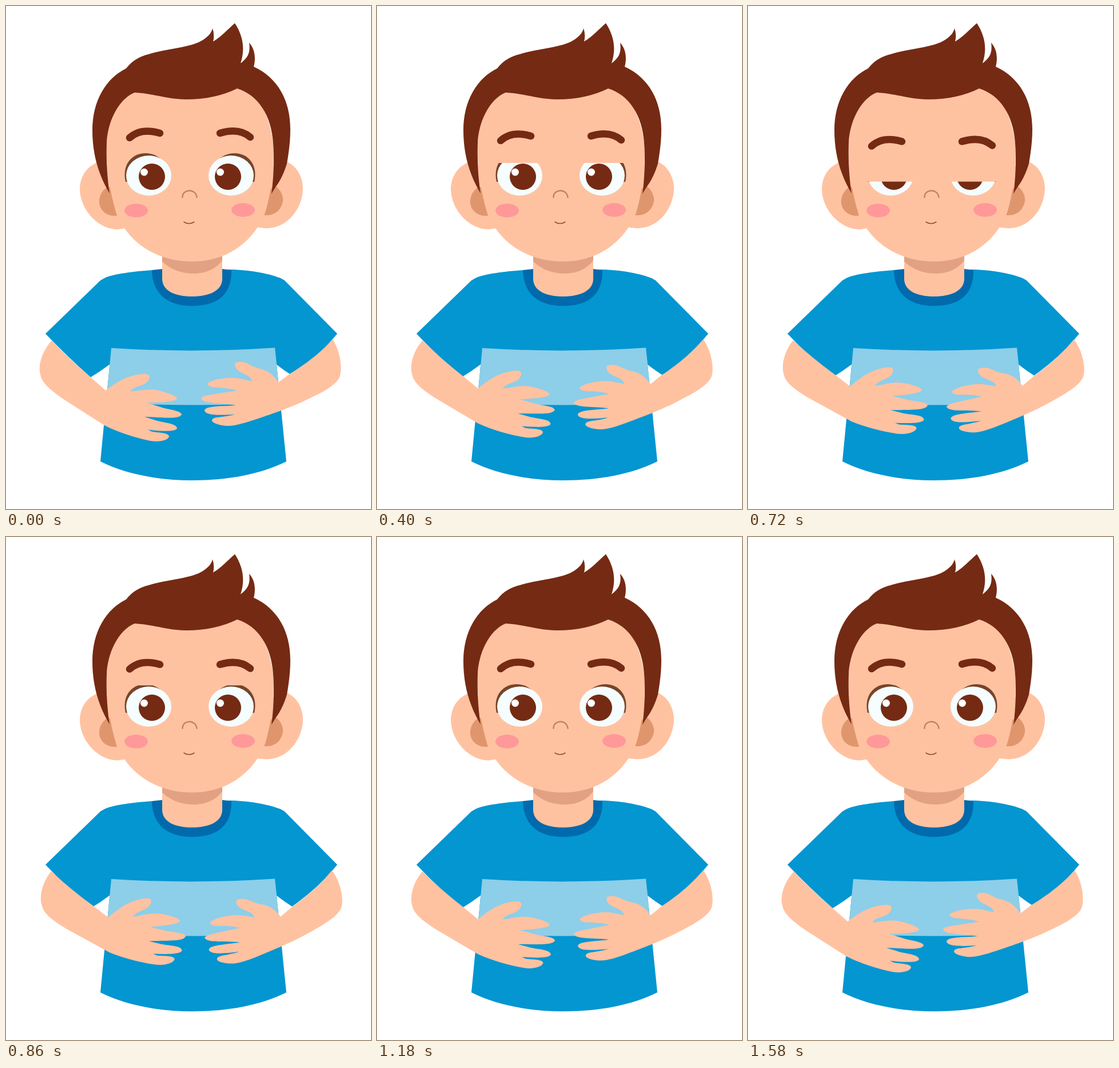
Animation of 638 by 878 pixels, one loop 1600 ms. Source, as an HTML page:

```html
<!DOCTYPE html>
<html lang="en">
<head>
<meta charset="utf-8">
<title>Boy holding his belly</title>
<style>
  html, body { margin: 0; width: 100%; height: 100%; overflow: hidden; background: #fff; }
  svg { display: block; width: 100vw; height: 100vh; }
  .skin { fill: #ffc2a1; }
  .hair { fill: #752a13; }
  .shirt { fill: #0396d1; }
  .ear { fill: #e0966d; }
  .cheek { fill: #ff9999; }
  .line { fill: none; stroke-linecap: round; }
  .brow { stroke: #752a13; stroke-width: 12.5; }
</style>
</head>
<body>
<svg viewBox="0 0 638 878">
  <defs>
    <clipPath id="open"><rect id="lid" x="190" y="250" width="260" height="100"/></clipPath>
    <g id="eye">
      <path fill="#75452a" d="M209 307C202 276 221 257 243 257C258 257 270 264 277 275L249 300Z"/>
      <ellipse cx="249.5" cy="296" rx="39.5" ry="35" fill="#f5fdff"/>
      <circle class="hair" cx="255" cy="298" r="23"/>
    </g>
  </defs>

  <!-- body -->
  <path class="shirt" d="M255 461C225 463 185 468 172 475L165 479L69 572Q108 613 148 648Q166 637 182 625L184 597L165 795C210 818 270 828 325 828C390 828 445 817 490 795L470 597L473 626Q486 636 500 645Q547 612 579 572L487 479L480 475C462 468 430 461 395 460Z"/>
  <path fill="#8dcee9" d="M184 597Q325 606 470 596.500L480 692Q325 701 175 692Z"/>
  <path fill="#006aac" d="M255 461C256 505 285 523.500 325 523.500C368 523.500 395 505 394 461L378 459H273Z"/>
  <path class="skin" d="M273 430V476C273 497 295 507 325 507C355 507 378 497 378 476V430Z"/>
  <path fill="#e1a182" d="M273 430V446C290 462 310 467 328 467C350 467 368 458 378 444V430Z"/>

  <!-- head -->
  <path class="skin" d="M165 271C142 278 129 297 129 320C130 357 162 390 195 390L215 387L200 290Z"/>
  <path class="skin" d="M485 270C508 276 519 298 519 320C517 357 490 388 455 388L435 386L450 290Z"/>
  <path class="ear" d="M179 315C166 322 162 335 163 344C165 360 180 368 194 366L188 320Z"/>
  <path class="ear" d="M472 315C482 322 485 335 484 341C480 360 465 367 451 365L460 320Z"/>
  <path class="skin" d="M176 240C174 275 180 320 194 366Q199 377 207 388C235 428 280 446 325 446C370 446 412 428 440 386Q452 368 456 350C465 315 470 275 467 240C460 180 430 140 404 130H225C195 150 177 200 176 240Z"/>
  <path class="hair" d="M181 327C165 300 151 265 151 217C151 165 175 126 210 109C222 94 234 88 250 84C285 73 330 73 350 55Q359 48 361 39Q365 50 362 62C376 54 386 42 400 30C415 53 418 76 410 100C420 92 428 85 425 64C435 75 437 90 433 106C475 125 497 165 497 215C497 238 494 257 491 275C482 305 472 313 464 328C468 300 469 265 467 240C464 190 440 155 404 144C380 156 350 163 315 163C280 163 260 153 225 151C195 163 177 205 176 240C175 270 177 300 181 327Z"/>

  <!-- face -->
  <ellipse class="cheek" cx="227.500" cy="357" rx="20.500" ry="12"/>
  <ellipse class="cheek" cx="414.500" cy="356" rx="20.500" ry="12"/>
  <path class="line" stroke="#c5805c" stroke-width="2.500" d="M308.500 334C308 319 332 318 333.500 334"/>
  <path class="line" stroke="#8e4a2c" stroke-width="1.500" d="M311 377Q320 382.500 329 377"/>
  <g clip-path="url(#open)">
    <use href="#eye"/>
    <use href="#eye" transform="translate(643) scale(-1 1)"/>
    <circle cx="241.500" cy="290" r="6.500" fill="#fff"/>
    <circle cx="374.500" cy="290" r="6.500" fill="#fff"/>
  </g>
  <g id="brows">
    <path class="line brow" d="M216 230Q236 212 269 222"/>
    <path class="line brow" d="M374 222Q407 212 427 229"/>
  </g>

  <!-- arms -->
  <path id="left" class="skin" d="M80 584C65 600 55 625 60 643C62 658 80 672 100 686L172 732C198 745 228 754 252 759C268 762 284 758 285 751C284 745 268 745 255 743L248 739.500C270 742 297 744 299 737C298 729 280 728 264 724L242 717C275 718 303 722 307 713C306 706 285 705 270 700L246 692.500C265 692 297 692 299 685C298 680 270 670 255 669.500C240 669 228 673 217 672.500C228 660 247 665 251 648C251 641 242 642 232 643C208 647 195 656 174 671L148 648Q112 618 80 584Z"/>
  <path id="right" class="skin" d="M571 582C586 605 588 635 583 648C575 665 545 678 520 690C490 704 450 717 432 723C410 730 393 735 378 732C367 730 360 727 360 723C362 716 378 719 400 713C380 714 349 716 347 706C349 698 372 699 402 697C378 692 345 695 341 685C343 679 365 678 380 675L404 671.500C380 663 356 669 352 660C354 653 385 647 405 649.500Q417 652 430 655C428 641 402 643 400 626C400 619 415 620 424 625Q434 631 447 634C462 638 469 647 476 657L496 642Q541 615 571 582Z"/>
</svg>
<script>
const LOOP = 1600, STEP = 20;
const BLINK = { start: 310, length: 580 };
const el = id => document.getElementById(id);
const [lid, brows, left, right] = ['lid', 'brows', 'left', 'right'].map(el);

// Smooth 0 → 1 → 0 over one unit of u.
const swell = u => u <= 0 || u >= 1 ? 0 : (1 - Math.cos(2 * Math.PI * u)) / 2;

function draw(now) {
  const t = Math.floor((now % LOOP) / STEP) * STEP;
  const angle = -3.9 * swell(t / LOOP);
  const shut = swell((t - BLINK.start) / BLINK.length);
  left.setAttribute('transform', `rotate(${angle} 72 600)`);
  right.setAttribute('transform', `rotate(${angle} 565 600)`);
  brows.setAttribute('transform', `translate(0 ${23 * shut})`);
  lid.setAttribute('y', 257 + 78 * shut);
}

let origin;
function tick(now) {
  origin ??= now;
  draw(now - origin);
  requestAnimationFrame(tick);
}
draw(0);
requestAnimationFrame(tick);
</script>
</body>
</html>
```
